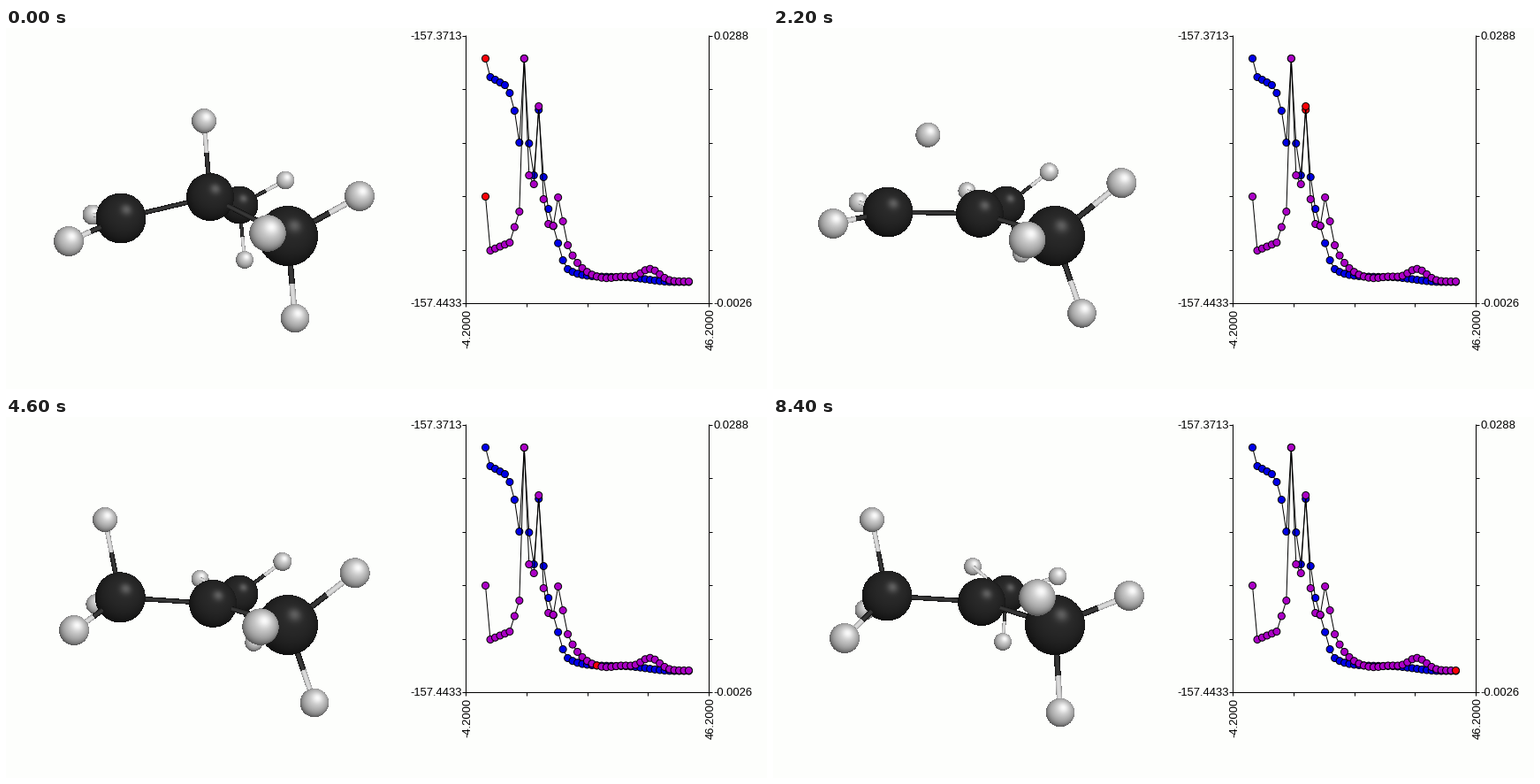
Animation, 861 px wide and 408 px high, one loop 8600 ms. Source, as a matplotlib script:

```python
import numpy as np
import matplotlib.pyplot as plt
from matplotlib.animation import FuncAnimation

W, H, DPI = 861, 408, 64
FRAMES, INTERVAL = 43, 200
SCENE_W = 450
PT = 72 / DPI
BG = np.array([253, 254, 252]) / 255


def unit(*v):
    return np.array(v) / np.linalg.norm(v)


def ease(i, a, b):
    t = np.clip((i - a) / (b - a), 0, 1)
    return t * t * (3 - 2 * t)


LIGHT = unit(0.16, 0.3, 0.94)
SHINE = unit(0.22, 0.34, 0.9)

# ---------- molecule ----------
# Each group eases to a bridging pose, then on to its final pose.
METHYL = (0, 13, 19, 42)
METHYLENE = (0, 8, 11, 30)
SHIFT = (0, 7, 7, 21)


class Atom:
    def __init__(self, kind, r, start, bridge=None, end=None, times=METHYL):
        self.kind, self.r, self.times = kind, r, times
        self.poses = [np.array(p, float) for p in (start, bridge or start, end or start)]

    def at(self, i):
        start, bridge, end = self.poses
        a, b, c, d = self.times
        return start + (bridge - start) * ease(i, a, b) + (end - bridge) * ease(i, c, d)

    @property
    def stick(self):
        return self.r * (0.1 if self.kind == "C" else 0.2)


C1 = Atom("C", 28.5, (130, 215), (130, 208), (129, 202), METHYLENE)
C2 = Atom("C", 27, (231, 191), (234, 211), (236, 209))
C3 = Atom("C", 34, (319, 235))
C4 = Atom("C", 21.5, (264, 200))

mover = Atom("H", 14, (224, 105), (191, 122), (112, 116), SHIFT)
h1_back = Atom("H", 11.5, (98, 211), (97, 197), (104, 218), METHYLENE)
h1_front = Atom("H", 17, (71, 241), (68, 221), (81, 250), METHYLENE)
h3_right = Atom("H", 17, (400, 190), (394, 174), (403, 202))
h3_low = Atom("H", 16.3, (327, 328), (351, 322), (325, 334))
h3_front = Atom("H", 20.7, (296, 232), (287, 240), (299, 204))
h4_right = Atom("H", 10.5, (316, 172), (312, 162), (322, 180))
h4_low = Atom("H", 10, (270, 262), (282, 255), (260, 254))
h4_back = Atom("H", 10, (226, 187), (219, 184), (226, 169))


def window(img, lo, hi):
    x0, y0 = np.maximum(np.floor(lo).astype(int), 0)
    x1, y1 = np.ceil(hi).astype(int)
    part = img[y0:y1, x0:x1]
    yy, xx = np.mgrid[y0:y0 + part.shape[0], x0:x0 + part.shape[1]] + 0.5
    return part, xx, yy


def paint(part, tone, mask):
    part[mask] = np.clip(tone, 0, 1)[mask][:, None]


def sphere(img, atom, i):
    c, r = atom.at(i), atom.r
    part, xx, yy = window(img, c - r - 2, c + r + 2)
    u, v = (xx - c[0]) / r, (c[1] - yy) / r
    d = np.hypot(u, v)
    n = np.stack([u, v, np.sqrt(np.clip(1 - d * d, 0, 1))], axis=-1)
    diff = np.clip(n @ LIGHT, 0, 1)
    spec = np.clip(n @ SHINE, 0, 1)
    if atom.kind == "C":
        tone = 0.07 + 0.1 * diff + 0.2 * spec ** 40
    else:
        tone = 0.36 + 0.46 * diff + 0.16 * spec ** 14
    paint(part, tone, d <= 1)


def bond(img, a, b, i, start=0.0):
    """Tapered two-tone stick from carbon a to b, first visible at start radii."""
    p, q = a.at(i), b.at(i)
    length = np.hypot(*(q - p))
    dx, dy = (q - p) / length
    part, xx, yy = window(img, np.minimum(p, q) - 6, np.maximum(p, q) + 6)
    along = (xx - p[0]) * dx + (yy - p[1]) * dy
    t = along / length
    half = a.stick + (b.stick - a.stick) * np.clip(t, 0, 1)
    u = ((xx - p[0]) * dy - (yy - p[1]) * dx) / half
    bulge = np.sqrt(np.clip(1 - u * u, 0, 1))
    dark = 0.06 + 0.16 * bulge ** 2
    pale = 0.4 + 0.46 * bulge
    tone = np.where((t > 0.58) & (b.kind == "H"), pale, dark)
    paint(part, tone, (np.abs(u) <= 1) & (along >= start * a.r) & (t <= 1))


def render(i):
    img = np.empty((H, SCENE_W, 3))
    img[:] = BG
    for atom in (h1_back, h4_back):
        sphere(img, atom, i)
    bond(img, C1, h1_back, i)
    for h in (h4_back, h4_low, h4_right):
        bond(img, C4, h, i)
    for atom in (C4, h4_low, h4_right):
        sphere(img, atom, i)

    bond(img, C1, C2, i)
    for c in (C1, C2):
        if np.hypot(*(c.at(i) - mover.at(i))) < 94:
            bond(img, c, mover, i)
    for atom in (C1, C2, mover):
        sphere(img, atom, i)
    bond(img, C1, h1_front, i, 0.86)
    sphere(img, h1_front, i)

    bond(img, C2, C3, i, 0.8)
    bond(img, C3, h3_right, i)
    bond(img, C3, h3_low, i)
    for atom in (C3, h3_right, h3_low):
        sphere(img, atom, i)
    bond(img, C3, h3_front, i, 0.6)
    sphere(img, h3_front, i)
    return img


# ---------- stage ----------
fig = plt.figure(figsize=(W / DPI, H / DPI), dpi=DPI, facecolor=BG)
ax = fig.add_axes([0, 0, 1, 1])
ax.axis("off")
scene = ax.imshow(render(0), extent=(0, SCENE_W, H, 0), interpolation="nearest", aspect="auto")
ax.set_xlim(0, W)
ax.set_ylim(H, 0)

# ---------- chart ----------
LEFT, RIGHT, TOP, BASE = 520.5, 795.5, 9.5, 311.5


def line(xs, ys, z=2):
    ax.plot(xs, ys, color="black", lw=PT, zorder=z, solid_capstyle="butt", snap=False)


line([LEFT, LEFT, RIGHT, RIGHT], [TOP - 1, BASE, BASE, TOP - 1])
for y in np.round(np.linspace(TOP, BASE, 6) - 0.5) + 0.5:
    line([LEFT - 4, LEFT], [y, y])
    line([RIGHT, RIGHT + 4], [y, y])
for x in np.floor(np.linspace(LEFT, RIGHT, 5)) + 0.5:
    line([x, x], [BASE, BASE + 4])


def label(x, y, s, ha, rot=0):
    ax.text(x, y, s, ha=ha, va="baseline", rotation=rot, rotation_mode="anchor",
            family="Liberation Sans", fontsize=13 * PT, color="black")


for y, left, right in ((TOP, "-157.3713", "0.0288"), (BASE, "-157.4433", "-0.0026")):
    label(LEFT - 5, y + 3.5, left, "right")
    label(RIGHT + 5, y + 3.5, right, "left")
for x, s in ((LEFT, "-4.2000"), (RIGHT, "46.2000")):
    label(x + 5, 317.5, s, "right", 90)


def bell(k, mid, width):
    return np.exp(-((k - mid) / width) ** 2 / 2)


def curve(knots, tail):
    """Jagged start through a few knots, then a smooth tail."""
    ks, ys = zip(*knots)
    return np.where(step <= ks[-1], np.interp(step, ks, ys), tail)


step = np.arange(FRAMES)
px = 542.5 + step * 230 / 42
energy = curve(
    [(0, 34), (1, 55), (4, 64), (5, 73), (6, 93), (7, 129), (8, 34), (9, 130),
     (10, 166), (11, 92), (12, 168), (13, 204), (16, 262), (17, 272)],
    281 - 9 * np.exp((17 - step) / 2.3) + 5.5 * ease(step, 28, 39))
gradient = curve(
    [(0, 190), (1, 251), (5, 242), (7, 207), (8, 34), (9, 166), (10, 176),
     (11, 88), (12, 193), (13, 221), (14, 223), (15, 191), (17, 245)],
    286 - 41 * np.exp((17 - step) / 3) - 4.5 * bell(step, 28.5, 2) - 14 * bell(step, 34, 1.9))
BLUE, PURPLE, RED = "#0000e8", "#ab00c6", "#fb0007"


def series(ys, color, z):
    line(px, ys + 0.5, z)
    return ax.scatter(px, ys + 0.5, s=(8 * PT) ** 2, c=[color] * FRAMES,
                      edgecolors="black", linewidths=PT, zorder=z + 1, snap=False)


dots = [(series(energy, BLUE, 3), BLUE), (series(gradient, PURPLE, 5), PURPLE)]


def update(i):
    scene.set_data(render(i))
    for pts, color in dots:
        pts.set_facecolors([RED if k == i else color for k in step])
    return [scene] + [pts for pts, _ in dots]


anim = FuncAnimation(fig, update, frames=FRAMES, interval=INTERVAL,
                     repeat=True, repeat_delay=0, blit=False)
plt.show()
```
